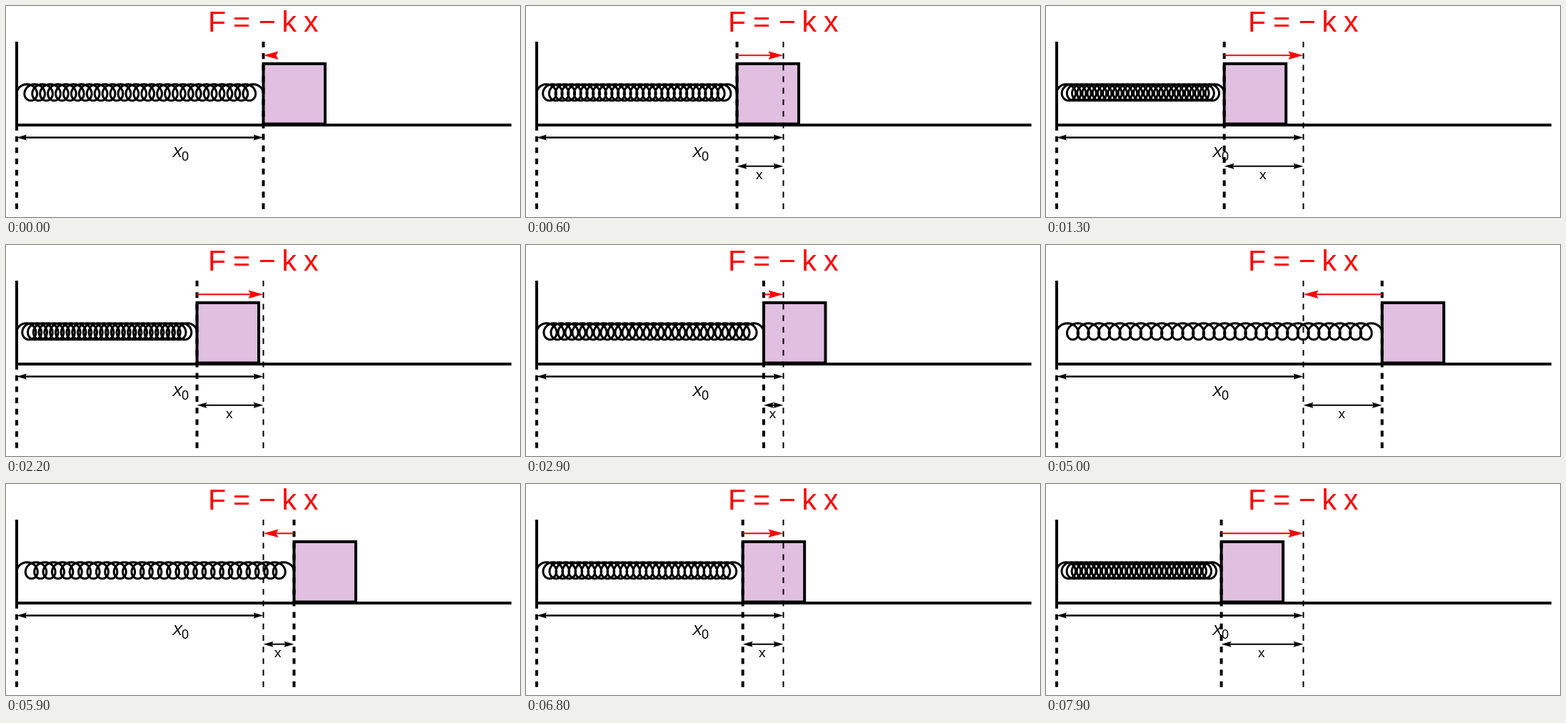
Animation of 720x296 px, one loop 8 s. Source, as an HTML page:

```html
<!DOCTYPE html>
<html lang="en">
<head>
<meta charset="utf-8">
<title>Spring force</title>
<style>
  html, body { margin: 0; width: 100%; height: 100%; overflow: hidden; background: #fff; }
  svg { display: block; }
  text { font-family: "Liberation Sans", Arial, sans-serif; }
  .line { fill: none; stroke: #000; stroke-width: 4; }
</style>
</head>
<body>
<svg width="720" height="296" viewBox="0 0 720 296">
  <path id="spring" class="line" style="stroke-width:3"/>
  <path class="line" d="M15 50V167M13 167H708"/>
  <path class="line" d="M15 167V285" stroke-dasharray="7.85"/>
  <rect id="block" y="81" width="86.5" height="84.5" fill="#e0bfe0" stroke="#000" stroke-width="4"/>
  <path id="edge" class="line" stroke-dasharray="8.1"/>
  <path class="line" style="stroke-width:2" d="M360.5 50V285" stroke-dasharray="8.1"/>
  <g id="restArrow"></g>
  <g id="shiftArrow"></g>
  <g id="forceArrow"></g>
  <text x="233" y="212" font-size="21" font-style="italic">X</text>
  <text x="246" y="217" font-size="18">0</text>
  <text id="shiftLabel" y="243" font-size="19" text-anchor="middle">x</text>
  <text x="283 318 354 386.5 417" y="36" font-size="41" fill="#f00">F=−kx</text>
</svg>
<script>
const WALL = 15, REST = 360.5, AMPLITUDE = 115;
const LOOPS = 29, RADIUS = 11.5, SPRING_Y = 121.3;
const STEP = 100, STEPS = 80;
const el = id => document.getElementById(id);

function head(tip, y, dir, length, half) {
  const back = tip - dir * length, notch = tip - dir * length * 0.85;
  return `<path d="M${tip} ${y}L${back} ${y - half}L${notch} ${y}L${back} ${y + half}Z"/>`;
}

function shaft(from, to, y, width, color) {
  return `<path d="M${from} ${y}H${to}" stroke="${color}" stroke-width="${width}"/>`;
}

function doubleArrow(left, right, y, width) {
  const inset = Math.min(10, (right - left) / 2);
  return shaft(left + inset, right - inset, y, width, "#000")
    + head(left, y, -1, 14, 4) + head(right, y, 1, 14, 4);
}

function forceArrow(from) {
  const dir = from >= REST ? -1 : 1, y = 69.3, length = 21;
  const line = Math.abs(from - REST) > length
    ? shaft(from, REST - dir * length * 0.8, y, 2, "#f00") : Math.abs(from - REST) > 17
    ? shaft(from, REST - dir * 17, y, 2, "#f00") : "";
  return `<g fill="#f00">${line}${head(REST, y, dir, length, 5.8)}</g>`;
}

// A looping trochoid stretched between the wall and the block.
function springPath(end) {
  const turns = 2 * Math.PI * LOOPS + Math.PI;
  const drift = (end - WALL - 2 * RADIUS) / turns;
  const count = (2 * LOOPS + 1) * 14;
  const points = Array.from({ length: count + 1 }, (_, i) => {
    const a = turns * i / count;
    const x = WALL + RADIUS * (1 - Math.cos(a)) + drift * a;
    const y = SPRING_Y - RADIUS * Math.sin(a);
    return x.toFixed(2) + " " + y.toFixed(2);
  });
  return "M" + points.join("L");
}

function draw(seconds) {
  const shift = -AMPLITUDE * Math.sin(seconds);
  const x = REST + shift;
  const shown = Math.abs(shift) > 1;
  el("spring").setAttribute("d", springPath(x));
  el("block").setAttribute("x", x);
  el("edge").setAttribute("d", `M${x} 50V285`);
  el("forceArrow").innerHTML = forceArrow(x);
  el("shiftArrow").innerHTML = shown
    ? doubleArrow(Math.min(x, REST), Math.max(x, REST), 224.7, 2) : "";
  el("shiftLabel").setAttribute("x", (x + REST) / 2 - 1.3);
  el("shiftLabel").setAttribute("visibility", shown ? "visible" : "hidden");
}

el("restArrow").innerHTML = doubleArrow(WALL, REST, 184.4, 2.5);

let start, current = -1;
function tick(now) {
  start ??= now;
  const step = Math.floor((now - start) / STEP) % STEPS;
  if (step !== current) draw((current = step) * STEP / 1000);
  requestAnimationFrame(tick);
}
draw(0);
requestAnimationFrame(tick);
</script>
</body>
</html>
```
